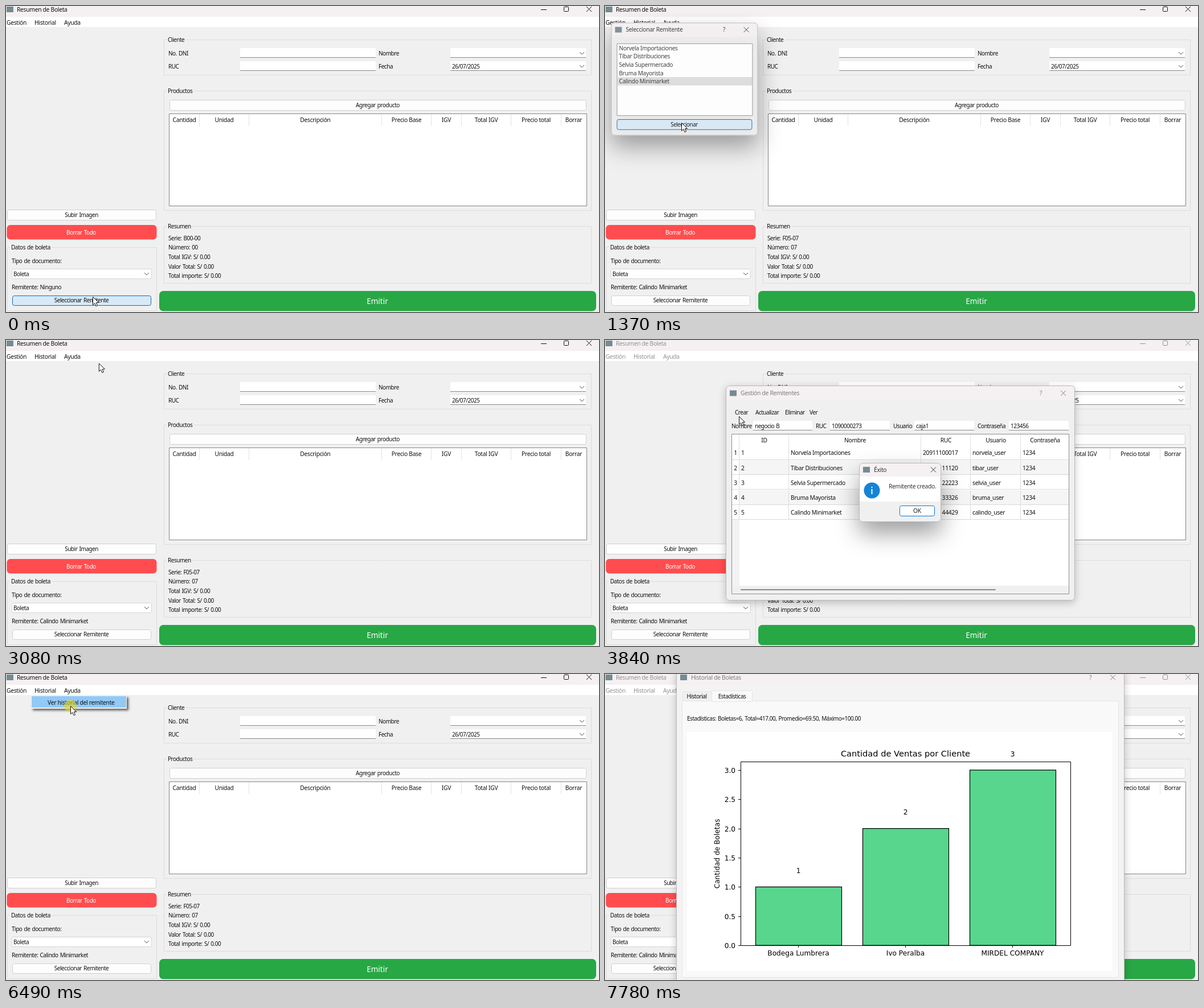
Write an HTML page with a canvas that moves like this. It is 1041 by 538 pixels and loops after 7850 ms.

```html
<!DOCTYPE html>
<html lang="es">
<head>
<meta charset="utf-8">
<title>Resumen de Boleta</title>
<style>
html, body { margin: 0; width: 100%; height: 100%; overflow: hidden; background: #f0f0f0; }
canvas { display: block; }
</style>
</head>
<body>
<canvas id="stage" width="1041" height="538"></canvas>
<script>
const c = document.getElementById('stage').getContext('2d');
const LOOP = 7850, GREY = '#f0f0f0', PINK = '#f5f0f2', DIM = '#7c7c7c', BLUE = '#0a6cbd';
// Font, letter spacing, word spacing
const SMALL = ['10px "Noto Sans", sans-serif', '-0.48px', '1px'];
const UI = ['10.3px "Noto Sans", sans-serif', '-0.3px', '0px'];
const BOLD = ['bold 10.3px "Noto Sans", sans-serif', '-0.3px', '0px'];
const BIG = ['13.5px "Noto Sans", sans-serif', '0px', '0px'];
const PLOT = ['12.15px "DejaVu Sans", sans-serif', '0px', '0px'];
const PLOT_TITLE = ['14.6px "DejaVu Sans", sans-serif', '0px', '0px'];

const SENDERS = ['Norvela Importaciones', 'Tíbar Distribuciones', 'Selvia Supermercado',
  'Bruma Mayorista', 'Calindo Minimarket'];
const SENDER_ROWS = SENDERS.map((name, i) => [i + 1, name, '209' + (11100017 + 1011103 * i),
  name.split(' ')[0].toLowerCase().replace('í', 'i') + '_user', '1234']);
const NEW_SENDER = ['negocio B', '1090000273', 'caja1', '123456'];
const PRODUCTS = [
  [13, 'ARROZ TOVEL', 'KILOGRAMO', '36.0'], [9, 'AZÚCAR RUBIA', 'CAJA', '3.0'],
  [11, 'GOLOSINA BRUMIDO F+N', 'KILOGRAMO', '32.0'], [12, 'GELATINA SURLA GUINDA', 'KILOGRAMO', '36.0'],
  [8, 'LECHE ENTERA', 'CAJA', '45.0'], [14, 'NADA', 'CAJA', '0.0'],
  [10, 'PAPAS ANDINAS', 'CAJA', '2.5'], [7, 'Pan Frances', 'BOLSA', '4.5'],
  [19, 'YOUGURT', 'UNIDAD', '10.5']];

// Pointer stops: arrival, x, y, time held there
const PATH = [
  [0, 152, 511, 180], [520, 70, 130, 300], [1180, 134, 205, 200], [1450, 20, 29, 30], [1540, 41, 51, 110],
  [1830, 340, 408, 50], [1950, 620, 150, 60], [2170, 302, 122, 230], [2560, 548, 296, 100],
  [2860, 805, 93, 90], [3130, 20, 29, 40], [3250, 45, 72, 60], [3420, 300, 151, 30], [3560, 740, 151, 20],
  [3660, 235, 134, 230], [4080, 546, 301, 120], [4600, 400, 330, 60], [5100, 418, 375, 100],
  [5800, 805, 93, 120], [6230, 68, 29, 90], [6440, 113, 56, 120], [6900, 400, 200, 60],
  [7250, 222, 38, 150], [7740, 300, 560, 110]];
const CLICKS = [150, 650, 1270, 1470, 1560, 1860, 2190, 2600, 2890, 3150, 3290, 3680, 4130, 5850, 6310, 6490, 7350];
const MODALS = [[200, 1355], [1570, 2920], [3300, 5870], [6620, 1e5]];

let t = 0;
const between = (a, b) => t >= a && t < b;
const clamp = v => Math.max(0, Math.min(1, v));
const typed = (s, a, b) => s.slice(0, Math.ceil(s.length * clamp((t - a) / (b - a))));

function setFont(font) {
  [c.font, c.letterSpacing, c.wordSpacing] = font;
}

function text(s, x, y, font = SMALL, color = '#111', align = 'left') {
  setFont(font);
  c.textAlign = align;
  c.fillStyle = color;
  c.fillText(s, x, y + 3.7);
}

function box(x, y, w, h, fill, stroke, r = 0) {
  const o = stroke ? 0.5 : 0;
  c.beginPath();
  c.roundRect(x + o, y + o, w, h, r);
  if (fill) { c.fillStyle = fill; c.fill(); }
  if (stroke) { c.strokeStyle = stroke; c.lineWidth = 1; c.stroke(); }
}

function line(color, ...p) {
  c.beginPath();
  for (let i = 0; i < p.length; i += 2) c.lineTo(p[i], p[i + 1]);
  c.strokeStyle = color;
  c.lineWidth = 1;
  c.stroke();
}

function cross(x, y, color) {
  line(color, x - 4.5, y - 4.5, x + 4.5, y + 4.5);
  line(color, x - 4.5, y + 4.5, x + 4.5, y - 4.5);
}

const icon = (x, y) => box(x, y, 12, 10, '#748b91');
const chevron = (x, y) => line('#555', x - 4, y - 2, x, y + 2, x + 4, y - 2);

function button(label, x, y, w, h, hot) {
  box(x, y, w, h, hot ? '#d8e9f7' : '#fdfdfd', hot ? BLUE : '#d0d0d0', 3);
  text(label, x + w / 2, y + h / 2, SMALL, '#111', 'center');
}

function input(x, y, w, value = '', combo = false) {
  box(x, y, w, 17, '#fff');
  line('#8a8a8a', x, y + 16.5, x + w, y + 16.5);
  text(value, x + 3, y + 9);
  if (combo) chevron(x + w - 7, y + 9);
}

function group(label, x, y, w, h) {
  box(x, y, w, h, null, '#dcdcdc');
  setFont(SMALL);
  box(x + 5, y - 5, c.measureText(label).width + 4, 11, GREY);
  text(label, x + 7, y);
}

function mainWindow(active) {
  const ink = active ? '#111' : '#929292';
  box(0, 0, 1041, 538, GREY);
  box(0, 0, 1041, 19, PINK);
  box(0, 19, 1041, 18, '#fff');
  icon(1, 1);
  text('Resumen de Boleta', 19, 6, UI, ink);
  line(ink, 939, 6.5, 949, 6.5);
  box(979, 1, 8, 8, null, ink, 1);
  cross(1023.5, 5.5, ink);
  text('Gestión', 1, 29, UI, ink);
  text('Historial', 50, 29, UI, ink);
  text('Ayuda', 102, 29, UI, ink);

  group('Cliente', 277, 59, 750, 62);
  text('No. DNI', 285, 83);
  text('RUC', 285, 106);
  text('Nombre', 654, 83);
  text('Fecha', 654, 106);
  input(411, 74, 238);
  input(411, 97, 238);
  input(780, 74, 238, '', true);
  input(780, 97, 238, '26/07/2025', true);

  group('Productos', 277, 149, 750, 210);
  button('Agregar producto', 287, 165, 731, 18);
  box(286, 189, 733, 162, '#fff', '#858585');
  [['Cantidad', 313, 339], ['Unidad', 383, 426], ['Descripción', 543, 659], ['Precio Base', 703, 746],
   ['IGV', 773, 799], ['Total IGV', 843, 886], ['Precio total', 930.5, 974], ['Borrar', 996.5]]
    .forEach(([s, x, edge]) => {
      text(s, x, 200, UI, '#111', 'center');
      if (edge) line('#e3e3e3', edge + .5, 190, edge + .5, 211);
    });

  const chosen = t > 1290;
  group('Resumen', 277, 387, 750, 100);
  ['Serie: ' + (chosen ? 'F05-07' : 'B00-00'), 'Número: ' + (chosen ? '07' : '00'),
   'Total IGV: S/ 0.00', 'Valor Total: S/ 0.00', 'Total importe: S/ 0.00']
    .forEach((s, i) => text(s, 285, 408 + 16.6 * i));

  button('Subir Imagen', 2, 358, 261, 18);
  box(1.5, 385, 263, 25.5, '#ff4d4f', null, 6);
  text('Borrar Todo', 132, 398, SMALL, '#fff', 'center');
  group('Datos de boleta', 2, 424, 262, 111);
  text('Tipo de documento:', 10, 448);
  box(10, 462, 245, 17, '#fff', '#d4d4d4', 2);
  text('Boleta', 13, 471);
  chevron(247, 471);
  text('Remitente: ' + (chosen ? SENDERS[4] : 'Ninguno'), 10, 494);
  button('Seleccionar Remitente', 11, 509, 243, 17, t < 220);
  box(269, 501, 767, 35.5, '#28a745', null, 7);
  text('Emitir', 652, 520, BIG, '#fff', 'center');
}

function menu(x, w, items, hot) {
  c.save();
  c.shadowColor = 'rgba(0,0,0,.6)';
  c.shadowBlur = 4;
  c.shadowOffsetX = c.shadowOffsetY = 3;
  box(x, 38, w, items.length * 20 + 3, '#f5f5f5');
  c.restore();
  items.forEach((s, i) => {
    if (i === hot) box(x + 1, 39 + 20 * i, w - 2, 20, '#91c9f7');
    text(s, x + 29, 50 + 20 * i, UI);
  });
}

// Window that fades and scales in at a, out at b; a focused one has dark ink and a deep shadow
function win(a, b, x, y, w, h, bar, focused, title, draw) {
  const shown = Math.min(clamp((t - a) / 100), 1 - clamp((t - b) / 120));
  if (!shown) return;
  const cx = x + w / 2, cy = y + h / 2, k = 0.9 + 0.1 * shown;
  c.save();
  c.globalAlpha = shown ** 0.6;
  c.translate(cx, cy);
  c.scale(k, k);
  c.translate(-cx, -cy);
  c.save();
  c.shadowColor = focused ? 'rgba(0,0,0,.38)' : 'rgba(0,0,0,.22)';
  c.shadowBlur = focused ? 40 : 14;
  c.shadowOffsetY = focused ? 20 : 4;
  box(x, y, w, h, GREY, null, 6);
  c.restore();
  c.save();
  box(x, y, w, h, null, null, 6);
  c.clip();
  box(x, y, w, bar, PINK);
  draw();
  c.restore();
  box(x, y, w - 1, h - 1, null, '#b9b9b9', 6);
  const ty = y + bar / 2, ink = focused ? '#333' : DIM;
  icon(x + 7, ty - 5);
  text(title, x + 26, ty, UI, ink);
  cross(x + w - (w < 200 ? 13.5 : 20.5), ty, ink);
  if (w > 200) text('?', x + w - 60, ty, UI, ink, 'center');
  c.restore();
}

function senderPicker() {
  win(200, 1355, 9, 28, 261, 201, 25, true, 'Seleccionar Remitente', () => {
    box(19, 65, 241, 128, '#fff', '#8f8f8f');
    if (t > 650) box(20, 125, 240, 15, '#dadada');
    SENDERS.forEach((s, i) => text(s, 23, 73.5 + 14.8 * i, UI, '#333'));
    button('Seleccionar', 19, 200, 240, 18, t > 1130);
  });
}

function manager(a, b, title, fields, heads, rows, picked, barEnd) {
  win(a, b, 212, 80, 613, 378, 27, false, title, () => {
    [['Crear', 228], ['Actualizar', 264], ['Eliminar', 316], ['Ver', 359]]
      .forEach(([s, x]) => text(s, x, 127));
    fields.forEach(([label, lx, x, w, value, combo]) => {
      text(label, lx, 151);
      input(x, 142, w, value, combo);
    });
    box(222, 165, 592, 281, '#fff', '#8a8f94');
    const cols = [236, 323, 555, 642, 730, 815];
    heads.forEach((s, i) =>
      text(s, (cols[i] + cols[i + 1]) / 2, 176, picked >= 0 && i === 1 ? BOLD : UI, '#111', 'center'));
    cols.slice(0, 5).forEach(x => line('#e2e2e2', x - .5, 166, x - .5, 185));
    rows.forEach((row, r) => {
      const y = 185.3 + 26.2 * r, end = Math.round(y + 25.7) - .5;
      if (r % 2) box(236, y, 578, 26, '#f5f5f5');
      if (r === picked) box(323, y, 232, 26, '#f0f0f0');
      line('#dadada', 223, end, 814, end);
      text(r + 1, 229, y + 13.3, r === picked ? BOLD : UI, '#111', 'center');
      row.forEach((s, i) => {
        c.save();
        c.beginPath();
        c.rect(cols[i], y, cols[i + 1] - cols[i], 26);
        c.clip();
        text(s, cols[i] + 3, y + 13.3, UI);
        c.restore();
        line('#dadada', cols[i] - .5, y, cols[i] - .5, end);
      });
    });
    const bottom = 185 + 26.2 * rows.length;
    box(223, bottom, 13, 432 - bottom, '#f2f2f2');
    box(223, 432, 591, 14, GREY);
    box(238, 438, barEnd - 238, 2, '#8a8a8a', null, 1);
  });
}

function message(a, b, x, w, title, body) {
  win(a, b, x, 216, w, 104, 24, true, title, () => {
    box(x, 240, w, 44, '#fff');
    c.beginPath();
    c.arc(x + 22.5, 264.5, 14, 0, 7);
    c.fillStyle = '#1583d6';
    c.fill();
    box(x + 21.5, 262, 2, 9, '#fff');
    box(x + 21.5, 258, 2, 2, '#fff');
    text(body, x + 52, 257, UI, '#333');
    box(x + w - 73, 291, 61, 18, '#fff', '#0078d4', 3);
    text('OK', x + w - 42, 300, UI, '#222', 'center');
  });
}

function chart() {
  text('Estadísticas: Boletas=6, Total=417.00, Promedio=69.50, Máximo=100.00', 144, 78);
  box(144, 102, 747, 420, '#fff');
  text('Cantidad de Ventas por Cliente', 527.5, 141, PLOT_TITLE, '#000', 'center');
  ['Bodega Lumbrera', 'Ivo Peralba', 'MIRDEL COMPANY'].forEach((s, i) => {
    const x = 264 + 188 * i, h = 102.7 * (i + 1), mid = x + 75.5;
    c.beginPath();
    c.rect(x + .5, 477 - h, 151, h);
    c.fillStyle = '#58d68d';
    c.fill();
    c.strokeStyle = '#000';
    c.lineWidth = 1.2;
    c.stroke();
    text(i + 1, mid, 449 - h, PLOT, '#000', 'center');
    text(s, mid, 491, PLOT, '#000', 'center');
    line('#000', mid, 477, mid, 481);
  });
  for (let i = 0; i < 7; i++) {
    const y = Math.round(477 - 51.35 * i) + .5;
    line('#000', 234, y, 238, y);
    text((i / 2).toFixed(1), 229, y + .7, PLOT, '#000', 'right');
  }
  box(238, 154, 579, 323, null, '#000');
  c.save();
  c.translate(197, 316);
  c.rotate(-Math.PI / 2);
  text('Cantidad de Boletas', 0, 0, PLOT, '#000', 'center');
  c.restore();
}

function history() {
  const stats = t > 7370;
  win(6620, 1e5, 125, -8, 787, 580, 28, false, 'Historial de Boletas', () => {
    box(125, 20, 787, 560, '#f3f3f3');
    box(135, 47, 766, 486, '#f9f9f9', '#e5e5e5');
    box(136, stats ? 31 : 29, 51, stats ? 16 : 19, stats ? '#f0f0f0' : '#f9f9f9', '#e5e5e5');
    box(187, stats ? 29 : 31, 71, stats ? 19 : 16, stats ? '#f9f9f9' : '#f0f0f0', '#e5e5e5');
    text('Historial', 161, 39.5, SMALL, '#111', 'center');
    text('Estadísticas', 223, 39, SMALL, '#111', 'center');
    if (stats) chart();
    else box(144, 56, 747, 466, '#fff', '#e0e0e0');
  });
}

function pointerAt() {
  const i = PATH.findLastIndex(p => p[0] <= t);
  const [t0, x0, y0, hold] = PATH[i];
  const [t1, x1, y1] = PATH[i + 1] || [LOOP, x0, y0];
  const u = clamp((t - t0 - hold) / Math.max(1, t1 - t0 - hold)), e = u * u * (3 - 2 * u);
  return [x0 + (x1 - x0) * e, y0 + (y1 - y0) * e];
}

function pointer() {
  const [x, y] = pointerAt();
  if (CLICKS.some(k => Math.abs(t - k) < 40)) {
    c.beginPath();
    c.arc(x, y, 11, 0, 7);
    c.fillStyle = 'rgba(235,215,30,.6)';
    c.fill();
  }
  c.save();
  c.translate(x + .5, y + .5);
  c.beginPath();
  [[0, 0], [0, 14], [3.2, 11], [5.6, 16.3], [8, 15.2], [5.8, 10.2], [10, 10]].forEach(p => c.lineTo(...p));
  c.closePath();
  c.fillStyle = '#fff';
  c.fill();
  c.strokeStyle = '#111';
  c.lineWidth = 1;
  c.stroke();
  c.restore();
}

function draw(now) {
  t = now % LOOP;
  mainWindow(!MODALS.some(m => between(...m)));
  senderPicker();

  const picked = t > 1870, updated = t > 2640;
  const products = PRODUCTS.map((row, i) => [...row.slice(0, 3), updated && i === 8 ? '7.5' : row[3], 'No']);
  manager(1570, 2920, 'Gestión de Productos', [
    ['Nombre', 222, 260, 172, picked ? 'yougurt' : ''], ['Unidad', 437, 472, 75, 'UNIDAD', true],
    ['Precio', 552, 584, 171, !picked ? '' : t < 1970 ? '10.5' : typed('7.5', 1970, 2080)],
    ['IGV', 760, 781, 34, 'No', true]],
    ['ID', 'Nombre', 'Unidad', 'Precio', 'IGV'], products, picked ? 8 : -1, 612);
  message(2240, 2620, 434, 161, 'Actualizado', 'Producto actualizado.');

  const [name, ruc, user] = NEW_SENDER;
  const senders = t > 4180 ? [...SENDER_ROWS, [8, name, ruc, user, '123']] : SENDER_ROWS;
  const value = i => typed(NEW_SENDER[i], 3410 + 55 * i, 3465 + 55 * i);
  manager(3300, 5870, 'Gestión de Remitentes', [
    ['Nombre', 222, 260, 104, value(0)], ['RUC', 370, 395, 105, value(1)],
    ['Usuario', 506, 543, 105, value(2)], ['Contraseña', 654, 709, 105, value(3)]],
    ['ID', 'Nombre', 'RUC', 'Usuario', 'Contraseña'], senders, -1, 686);
  message(3700, 4150, 446, 144, 'Éxito', 'Remitente creado.');

  const manage = ['Gestión de Productos', 'Gestión de Remitentes'];
  if (between(1470, 1570)) menu(0, 166, manage, t > 1510 ? 0 : -1);
  if (between(3150, 3300)) menu(0, 166, manage, t > 3220 ? 1 : 0);
  if (between(6320, 6540)) menu(44, 168, ['Ver historial del remitente'], t > 6400 ? 0 : -1);
  history();
  pointer();
}

const start = performance.now();
function tick() {
  draw(performance.now() - start);
  requestAnimationFrame(tick);
}
tick();
</script>
</body>
</html>
```
